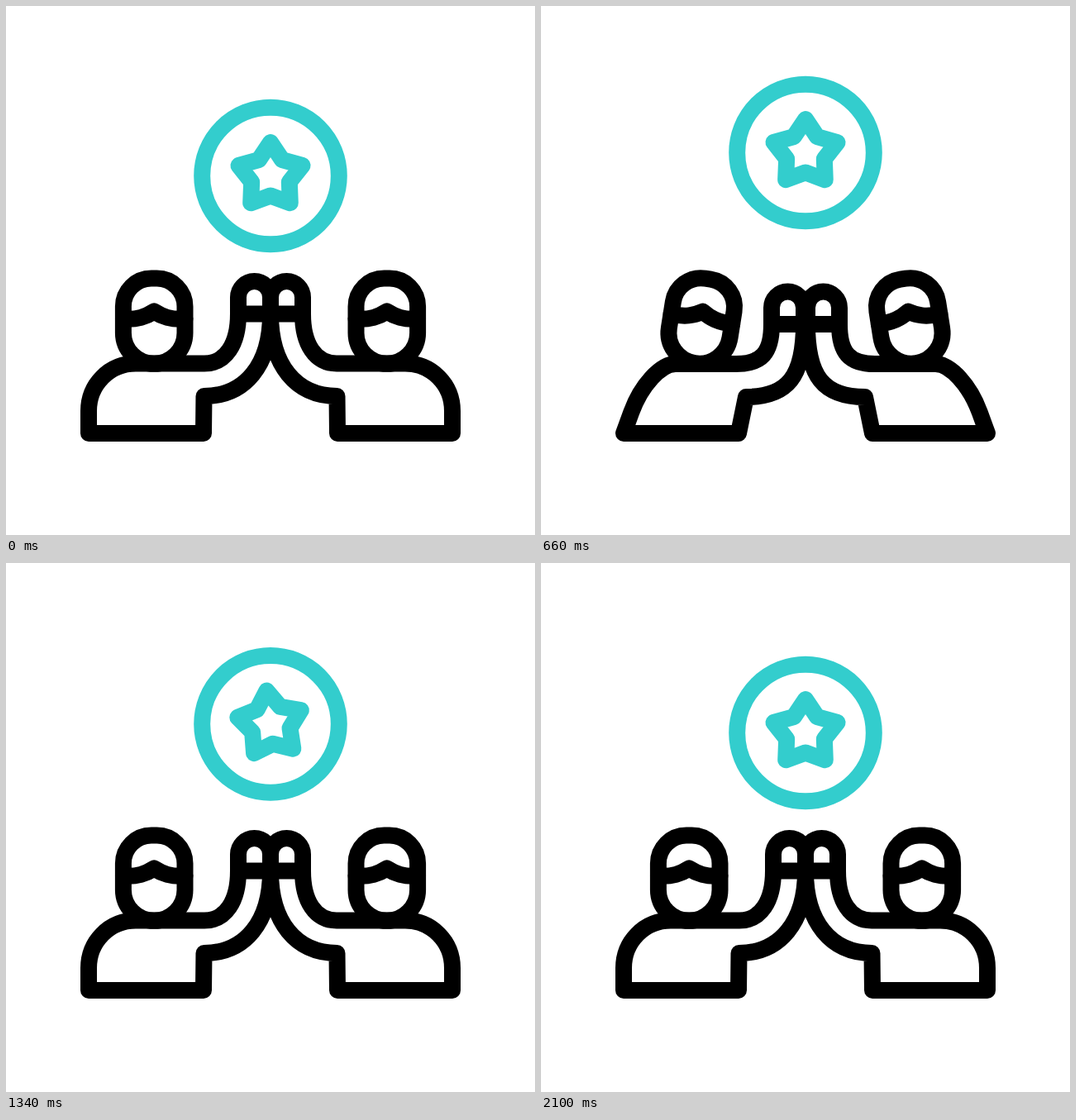
Write an HTML page that moves like this. It is 640 px wide and 640 px high and loops after 2.4 s.

```html
<!DOCTYPE html>
<html lang="en">
<head>
<meta charset="utf-8">
<title>High five</title>
<style>
  html, body { margin: 0; width: 100%; height: 100%; overflow: hidden; background: #fff; }
  svg { display: block; width: 100vw; height: 100vh; }
  .line { fill: none; stroke-width: 20; stroke-linecap: round; stroke-linejoin: round; }
  .teal { stroke: #33cdcd; }
  .ink { stroke: #000; }
</style>
</head>
<body>
<svg viewBox="0 0 640 640">
  <path id="sparks" class="line teal"/>
  <g id="coin" class="line teal">
    <circle r="82.8"/>
    <path id="star"/>
  </g>
  <defs>
    <g id="person" class="line ink">
      <path id="body" fill="#fff"/>
      <g id="head">
        <path d="M-37.3-17.5a34 34 0 0 1 34-34h6.6a34 34 0 0 1 34 34v32a37.3 37.3 0 0 1-74.6 0z"/>
        <path d="M-37.3-2.5C-20-1.5-10-5 0-11.5C10-5 20-1.5 37.3-2.5"/>
      </g>
    </g>
  </defs>
  <use href="#person"/>
  <use href="#person" transform="translate(640) scale(-1 1)"/>
</svg>
<script>
const LOOP = 2400, FLOOR = 517;
const $ = id => document.getElementById(id);
const clamp = k => Math.min(1, Math.max(0, k));
const mix = (a, b, k) => a + (b - a) * k;
const ease = k => (1 - Math.cos(Math.PI * clamp(k))) / 2;

// Points are [x, y]; an angle of 0 points straight up and grows clockwise.
const move = ([x, y], [dx, dy], k = 1) => [x + dx * k, y + dy * k];
const toward = (a, b, k) => [mix(a[0], b[0], k), mix(a[1], b[1], k)];
const up = degrees => {
  const a = degrees * Math.PI / 180;
  return [Math.sin(a), -Math.cos(a)];
};

// Eased value at time t through [time, value] keys.
function swing(t, keys) {
  const next = keys.findIndex(key => key[0] > t);
  if (next === 0) return keys[0][1];
  if (next < 0) return keys[keys.length - 1][1];
  const [t0, v0] = keys[next - 1], [t1, v1] = keys[next];
  return mix(v0, v1, ease((t - t0) / (t1 - t0)));
}

const rest = {
  head: [179.2, 381], tilt: 0, hem: 100, lean: 0, shoulder: [157, 432.5], pit: [240, 432.5],
  elbow: [239.5, 472], wrist: [300.5, 372.5], turn: 0, bend: 0.62
};
const open = {
  head: [118.5, 391.5], tilt: -20, hem: 74, lean: -4, shoulder: [125, 442], pit: [186, 429.5],
  elbow: [206, 465], wrist: [224.5, 347], turn: -25, bend: 0.6
};
const clap = {
  head: [194, 381], tilt: 9, hem: 100, lean: 20, shoulder: [163, 433], pit: [236, 433],
  elbow: [248, 473], wrist: [298.5, 385], turn: 0, bend: 0.72
};

function blend(pull, dip) {
  const sum = (r, o, c) => r + (o - r) * pull + (c - r) * dip;
  const pose = {};
  for (const part in rest) {
    const r = rest[part], o = open[part], c = clap[part];
    pose[part] = Array.isArray(r) ? r.map((v, i) => sum(v, o[i], c[i])) : sum(r, o, c);
  }
  return pose;
}

// Rounded corner from a to b, with tangent directions u at a and v at b.
function bow(a, u, b, v, roundness) {
  const cross = (p, q) => p[0] * q[1] - p[1] * q[0];
  const corner = move(a, u, cross(move(b, a, -1), v) / cross(u, v));
  return `C${toward(a, corner, roundness)} ${toward(b, corner, roundness)} ${b}`;
}

function drawPerson(t) {
  const p = blend(
    swing(t, [[0, 0], [370, 1.28], [660, 0]]),
    swing(t, [[460, 0], [660, 1], [900, 0]])
  );
  const along = move(p.pit, p.shoulder, -1);
  const arm = up(p.turn), across = up(p.turn + 90);
  const wrist = side => move(p.wrist, across, 19.5 * side);
  const palm = side => move(wrist(side), arm, 20);
  const hem = [p.hem, FLOOR], flank = move(hem, up(p.lean), 27);

  $("body").setAttribute("d",
    `M${wrist(1)}${bow(wrist(1), arm, p.elbow, along, p.bend)}` +
    `L${p.hem + 139},${FLOOR}L${hem}L${flank}` +
    bow(flank, up(p.lean), p.shoulder, along, 0.56) +
    `L${p.pit}${bow(p.pit, along, wrist(-1), arm, p.bend)}` +
    `L${palm(-1)}A19.5 19.5 0 0 1 ${palm(1)}ZL${wrist(-1)}`);
  $("head").setAttribute("transform", `translate(${p.head}) rotate(${p.tilt})`);
}

// Every bounce of the coin: time, height and tilt at the turning point.
const bounces = [
  [0, 205.5, 0], [340, 260, -23.3], [740, 169, 2.5], [1075, 261, 6.3],
  [1425, 184.5, -8.5], [1750, 221, 3.4], [2100, 205.5, 0]
];

function drawCoin(t) {
  const y = swing(t, bounces);
  const tilt = swing(t, bounces.map(([time, , angle]) => [time, angle]));
  $("coin").setAttribute("transform", `translate(320 ${y})`);
  $("star").setAttribute("transform", `rotate(${tilt})`);
}

const corners = Array.from({ length: 10 }, (_, i) => move([0, 0], up(i * 36), i % 2 ? 24 : 40.5));
$("star").setAttribute("d", `M${corners.join("L")}Z`);

function travel(t, start) {
  const k = clamp((t - start) / 500);
  return k < 0.5 ? 4 * k ** 3 : 1 - 4 * (1 - k) ** 3;
}

// Three sparks fly to the left, three opposite ones to the right.
function drawSparks(t) {
  const front = travel(t, 622), back = travel(t, 712);
  let d = "";
  if (front - back > 0.005) {
    for (const side of [1, -1]) {
      for (const end of [[-157, -90], [-225, 0.5], [-165, 81.5]]) {
        const at = k => move([321.7, 196], toward([-87, 0], end, k), side);
        d += `M${at(back)}L${at(front)}`;
      }
    }
  }
  $("sparks").setAttribute("d", d);
}

const began = performance.now();
function tick() {
  const t = (performance.now() - began) % LOOP;
  drawSparks(t);
  drawCoin(t);
  drawPerson(t);
  requestAnimationFrame(tick);
}
tick();
</script>
</body>
</html>
```
